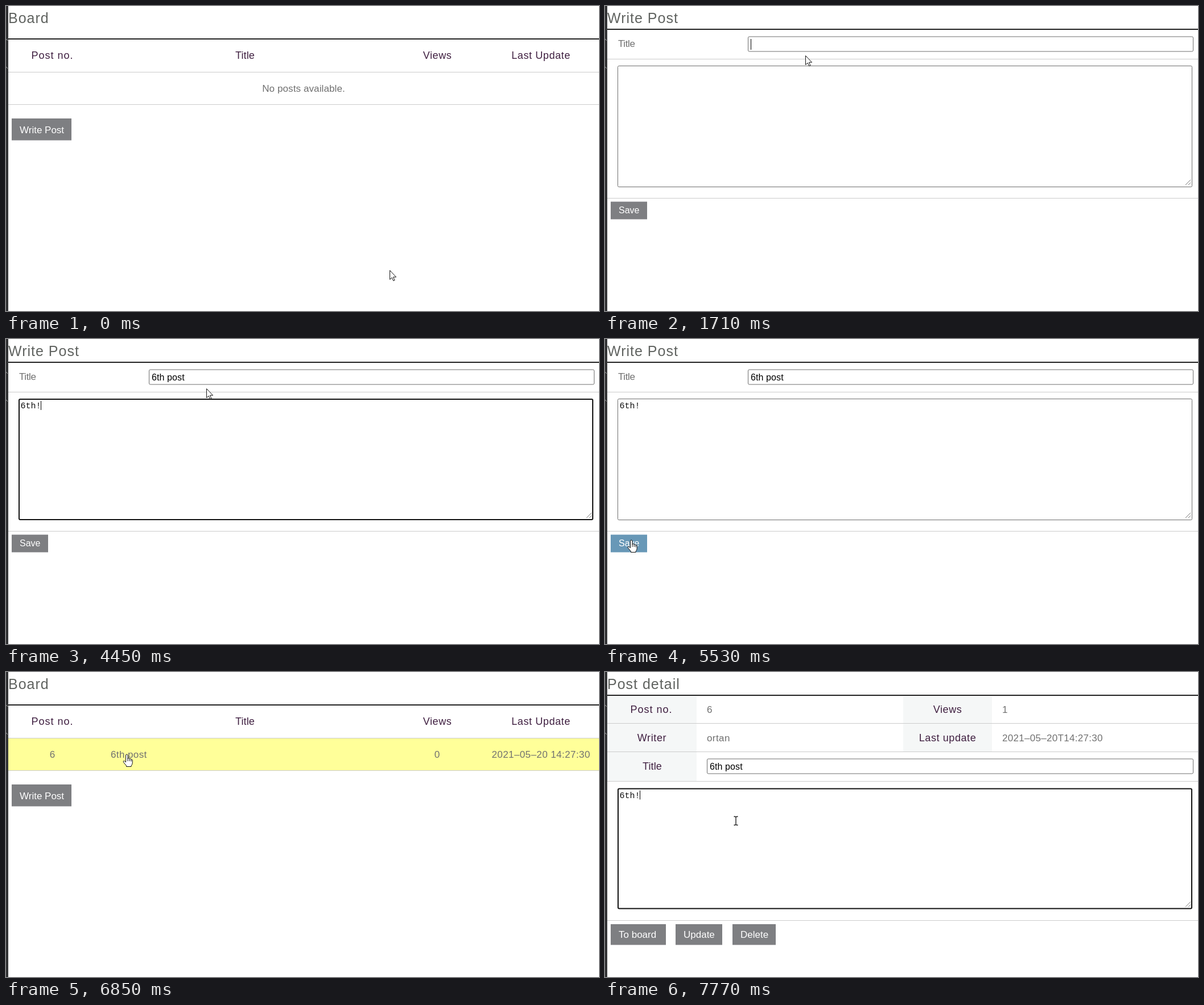
An HTML page for the animation above (8 s loop, 1042x537 px).

```html
<!DOCTYPE html>
<html lang="en">
<head>
<meta charset="utf-8">
<title>Board</title>
<style>
html, body { margin: 0; width: 100%; height: 100%; overflow: hidden; background: #fff; }
svg { display: block; }
text { font: 17px "Liberation Sans", Arial, sans-serif; fill: #707070; white-space: pre; }
.h1 { font-size: 25px; letter-spacing: 1px; fill: #606360; }
.th { font-size: 18px; letter-spacing: .6px; fill: #3f1f40; text-anchor: middle; }
.mid { text-anchor: middle; }
.on { fill: #fff; }
.in { font-size: 16px; fill: #000; }
.mono { font: 15px "Liberation Mono", monospace; fill: #111; }
</style>
</head>
<body>
<svg id="stage" width="1042" height="537"></svg>
<script>
const stage = document.getElementById('stage');
const pen = document.createElement('canvas').getContext('2d');
pen.font = '16px "Liberation Sans", Arial, sans-serif';

const LOOP = 8000, STEP = 76.6;

// Pointer path: time, x, y
const path = [
  [0, 674, 465], [380, 95, 186], [455, 58.5, 223], [920, 58.5, 223],
  [1490, 352, 60], [1610, 352, 60], [1680, 352, 87], [4690, 352, 87],
  [5200, 46.5, 354], [5920, 46.5, 354], [6430, 203, 130], [6620, 203, 130],
  [6700, 208, 152], [6810, 212.5, 145], [7400, 212.5, 145], [7730, 230, 262], [LOOP, 230, 262]
];
const titleKeys = [2260, 2340, 2410, 2490, 2570, 2640, 2800, 2800];
const bodyKeys = [3670, 3820, 3900, 4450];

const rect = (x, y, w, h, fill, more = '') =>
  `<rect x="${x}" y="${y}" width="${w}" height="${h}" fill="${fill}" ${more}/>`;
const text = (x, y, s, cls = '', gap) =>
  `<text x="${x}" y="${y}" class="${cls}"${gap === undefined ? '' : ` style="letter-spacing:${gap}px"`}>${s}</text>`;
const rule = (y, h = 1, color = '#ccc') => rect(4, y, 1038, h, color);
const caret = (x, y, h) => rect(x, y, 1, h, '#000');
const inside = (p, x, y, w, h) => p.x >= x && p.x < x + w && p.y >= y && p.y < y + h;
const typed = (s, keys, t) => s.slice(0, keys.filter(k => k <= t).length);
const blink = (t, since) => (t - since) % 1000 < 500;

function pointerAt(t) {
  t = Math.floor(t / STEP) * STEP;
  const i = path.findIndex(k => k[0] > t), [t0, x0, y0] = path[i - 1], [t1, x1, y1] = path[i];
  const u = (t - t0) / (t1 - t0), e = u * u * (3 - 2 * u);
  return { x: x0 + (x1 - x0) * e, y: y0 + (y1 - y0) * e, shape: 'arrow' };
}

function button(p, x, y, w, h, base, label, size = 17) {
  const hover = inside(p, x, y, w, h);
  if (hover) p.shape = 'hand';
  return rect(x, y, w, h, hover ? '#6898b7' : '#7e7f82') +
    `<text x="${x + 14}" y="${base}" class="on" style="font-size:${size}px">${label}</text>`;
}

function input(p, x, y, w, value) {
  if (inside(p, x, y, w, 27)) p.shape = 'beam';
  return rect(x + .5, y + .5, w - 1, 26, '#fff', 'rx="2" stroke="#6e6e6e"') +
    text(x + 5, y + 19, value, 'in', .1);
}

function textarea(p, y, h, value, focus, showCaret) {
  if (inside(p, 22, y, 1010, h)) p.shape = 'beam';
  return (focus
    ? rect(23, y + 1, 1008, h - 2, '#fff', 'rx="2" stroke="#111" stroke-width="2"')
    : rect(22.5, y + .5, 1009, h - 1, '#fff', 'rx="2" stroke="#6e6e6e"')) +
    `<path d="M1020 ${y + h - 4}l9 -9m-4 9l4 -4" stroke="#777"/>` +
    text(25.5, y + 17, value, 'mono') +
    (showCaret ? caret(25 + 9 * value.length, y + 4, 16) : '');
}

function board(p, filled) {
  const hover = filled && inside(p, 4, 117, 1038, 56);
  let s = text(4, 30, 'Board', 'h1') + rule(57, 2, '#222');
  if (hover) {
    s += rect(4, 117, 1038, 56, '#ffff99');
    if (p.x > 184 && p.x < 248) p.shape = 'hand';
  }
  s += rule(116) + rule(173) +
    text(81.5, 93, 'Post no.', 'th', 1) + text(420, 93, 'Title', 'th', .1) +
    text(758, 93, 'Views', 'th') + text(940, 93, 'Last Update', 'th');
  s += filled
    ? text(81.5, 151, '6', 'mid') + text(184, 151, '6th post', '', .4) +
      text(757.5, 151, '0', 'mid') + text(940, 151, '2021–05–20 14:27:30', 'mid', .4)
    : text(523, 151, 'No posts available.', 'mid', .1);
  return s + button(p, 10, 198, 105, 38.5, 223.5, 'Write Post');
}

function writer(p, t) {
  const title = typed('6th post', titleKeys, t), body = typed('6th!', bodyKeys, t);
  const titleCaret = t >= 1630 && t < 3120 && !(t >= 2030 && t < 2260);
  const focus = t >= 3120 && t < 5380;
  const lastKey = [3120, ...bodyKeys].filter(k => k <= t).pop();
  return text(4, 30, 'Write Post', 'h1') + rule(40, 2, '#222') +
    text(23, 72, 'Title', '', -.4) + input(p, 251, 53.5, 783, title) +
    (titleCaret ? caret(256 + pen.measureText(title).width, 58, 19) : '') +
    rule(93) + textarea(p, 105, 214, body, focus, focus && blink(t, lastKey)) +
    rule(338) + button(p, 10, 344.5, 64, 31, 365, 'Save', 16);
}

function detail(p, t) {
  const focus = t >= 7770;
  return text(4, 30, 'Post detail', 'h1') +
    rect(4, 42, 157, 150, '#f5f7f7') + rect(524, 42, 156, 98, '#f5f7f7') +
    rule(40, 2, '#222') + rule(90) + rule(140) + rule(192) + rule(437) +
    text(81.5, 72, 'Post no.', 'th', 1) + text(602, 72, 'Views', 'th') +
    text(82.5, 122, 'Writer', 'th') + text(602, 122, 'Last update', 'th') +
    text(83, 172, 'Title', 'th', .1) +
    text(179, 72, '6') + text(698, 72, '1') +
    text(179, 122, 'ortan', '', .4) + text(698, 122, '2021–05–20T14:27:30', '', .3) +
    input(p, 179, 152.5, 855, '6th post') +
    textarea(p, 204.5, 213, '6th!', focus, focus) +
    button(p, 10, 444, 97, 36.5, 468, 'To board') +
    button(p, 124, 444, 82, 36.5, 468, 'Update') +
    button(p, 224, 444, 76, 36.5, 468, 'Delete');
}

const shapes = {
  arrow: '<path d="M.5 .5V16.5L4.2 13.2L6.7 18.8L9 17.8L6.5 12.2H11.5Z" fill="#fff" stroke="#111"/>',
  hand: '<path d="M-2 13V2Q-2 0 -.3 0Q1.5 0 1.5 2V8Q1.5 6.5 3 6.5Q4.7 6.7 4.7 8.5Q5 7.2 6.3 7.5Q7.5 7.8 7.5 9.5' +
    'Q8 8.5 9 9Q9.7 9.5 9.7 11V15Q9.5 18 7.5 20V21.5H-1V20L-6 13.8Q-7 12 -5.5 11.5Q-4.5 11.3 -2 13.7Z" fill="#fff" stroke="#111"/>' +
    '<path d="M1.5 8V12M4.7 8.5V12M7.5 9.5V12.5" stroke="#111"/>',
  beam: '<path d="M-3.5 -7.5H-1.5L0 -6.5L1.5 -7.5H3.5M0 -6.5V6.5M-3.5 7.5H-1.5L0 6.5L1.5 7.5H3.5" fill="none" stroke="#111" stroke-width="1.3"/>'
};
const edge = rect(0, 0, 4, 537, '#323335') +
  '<path d="M0 58l3 3M0 107l3 3" stroke="#aaa"/>';

let last = '';
function draw(now) {
  const t = now % LOOP, p = pointerAt(t);
  const page = t < 1000 ? board(p, false) : t < 5610 ? writer(p, t) : t < 7000 ? board(p, true) : detail(p, t);
  const s = page + edge + `<g transform="translate(${p.x} ${p.y})">${shapes[p.shape]}</g>`;
  if (s !== last) stage.innerHTML = last = s;
  requestAnimationFrame(draw);
}
const start = performance.now();
draw(0);
function tick() { return performance.now() - start; }
</script>
</body>
</html>
```
